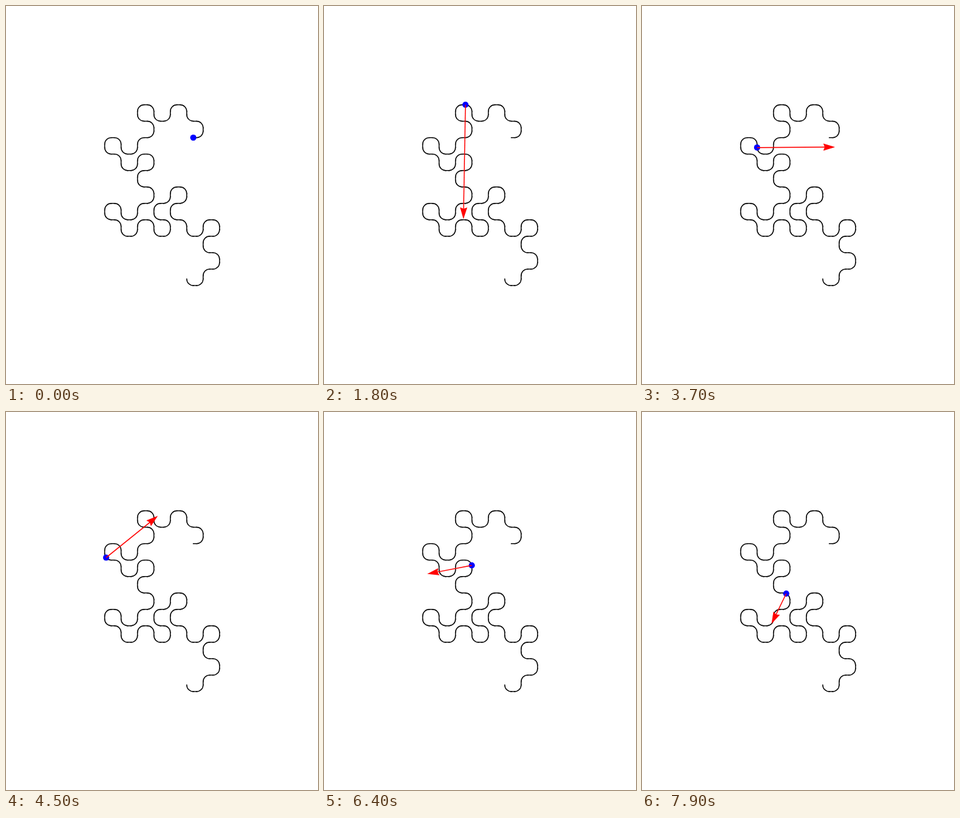
These frames come from a looping animation (476 px wide and 576 px high, 8 s). An HTML page with a canvas:

```html
<!DOCTYPE html>
<html lang="en">
<head>
<meta charset="utf-8">
<title>Damped motion on a dragon curve</title>
<style>
  html, body { margin: 0; width: 100%; height: 100%; overflow: hidden; background: #fff; }
  canvas { display: block; }
</style>
</head>
<body>
<canvas id="stage" width="476" height="576"></canvas>
<script>
const ctx = document.getElementById('stage').getContext('2d');

const START_X = 285.75, START_Y = 200.6, SCALE = 1.0015;
const STEP = 25, RADIUS = 10, LINE = STEP - 2 * RADIUS;
const ARC = RADIUS * Math.PI / 2, PERIOD = LINE + ARC;
const CORNERS = 63, FRAMES = 80, FRAME_MS = 100;
const DRAG = 0.99, SPEED = 10, ARROW = 250, STROKE = 1.4;

// Paper-folding rule: +1 turns clockwise on screen, -1 counterclockwise.
function turn(n) {
  while (n % 2 === 0) n /= 2;
  return n % 4 === 1 ? -1 : 1;
}

// Each piece is a short straight followed by a quarter arc.
function buildPieces() {
  const pieces = [];
  let x = 0, y = 0, dx = 1, dy = 0;
  for (let n = 1; n <= CORNERS; n++) {
    const side = turn(n);
    const nx = -dy * side, ny = dx * side;
    const ax = x + dx * LINE, ay = y + dy * LINE;
    const cx = ax + nx * RADIUS, cy = ay + ny * RADIUS;
    pieces.push({ x, y, dx, dy, ax, ay, cx, cy, side, from: Math.atan2(-ny, -nx) });
    x = cx + dx * RADIUS;
    y = cy + dy * RADIUS;
    dx = nx;
    dy = ny;
  }
  return pieces;
}

const pieces = buildPieces();

// Straights and arcs are stroked one by one, so their capped ends overlap.
function drawCurve() {
  ctx.strokeStyle = '#000';
  ctx.lineWidth = STROKE;
  ctx.lineCap = 'square';
  for (const p of pieces) {
    ctx.beginPath();
    ctx.moveTo(p.x, p.y);
    ctx.lineTo(p.ax, p.ay);
    ctx.stroke();
    ctx.beginPath();
    ctx.arc(p.cx, p.cy, RADIUS, p.from, p.from + p.side * Math.PI / 2, p.side < 0);
    ctx.stroke();
  }
  ctx.lineCap = 'butt';
}

// Position at arc length s and inward unit normal (zero on straights).
function locate(s) {
  const p = pieces[Math.floor(s / PERIOD)];
  const d = s % PERIOD;
  if (d <= LINE) return { x: p.x + p.dx * d, y: p.y + p.dy * d, nx: 0, ny: 0 };
  const a = p.from + p.side * (d - LINE) / RADIUS;
  const c = Math.cos(a), q = Math.sin(a);
  return { x: p.cx + RADIUS * c, y: p.cy + RADIUS * q, nx: -c, ny: -q };
}

function drawArrow(x, y, angle, length) {
  ctx.save();
  ctx.translate(x, y);
  ctx.rotate(angle);
  ctx.strokeStyle = ctx.fillStyle = '#f00';
  ctx.lineWidth = STROKE;
  ctx.beginPath();
  ctx.moveTo(0, 0);
  ctx.lineTo(length - 14, 0);
  ctx.stroke();
  ctx.beginPath();
  ctx.moveTo(length, 0);
  ctx.lineTo(length - 18, 5.5);
  ctx.lineTo(length - 15.8, 0);
  ctx.lineTo(length - 18, -5.5);
  ctx.fill();
  ctx.restore();
}

function draw(k) {
  const decay = DRAG ** k;
  const pos = locate(SPEED * (1 - decay) / (1 - DRAG));
  ctx.setTransform(1, 0, 0, 1, 0, 0);
  ctx.fillStyle = '#fff';
  ctx.fillRect(0, 0, 476, 576);
  ctx.setTransform(SCALE, 0, 0, SCALE, START_X, START_Y);
  drawCurve();
  ctx.fillStyle = '#00f';
  ctx.beginPath();
  ctx.arc(pos.x, pos.y, 4.7, 0, Math.PI * 2);
  ctx.fill();
  if (pos.nx || pos.ny) {
    drawArrow(pos.x, pos.y, Math.atan2(pos.ny, pos.nx), ARROW * decay * decay);
  }
}

const start = performance.now();
function tick() {
  const t = Math.max(0, performance.now() - start);
  draw(Math.floor(t / FRAME_MS) % FRAMES);
  requestAnimationFrame(tick);
}
tick();
</script>
</body>
</html>
```
